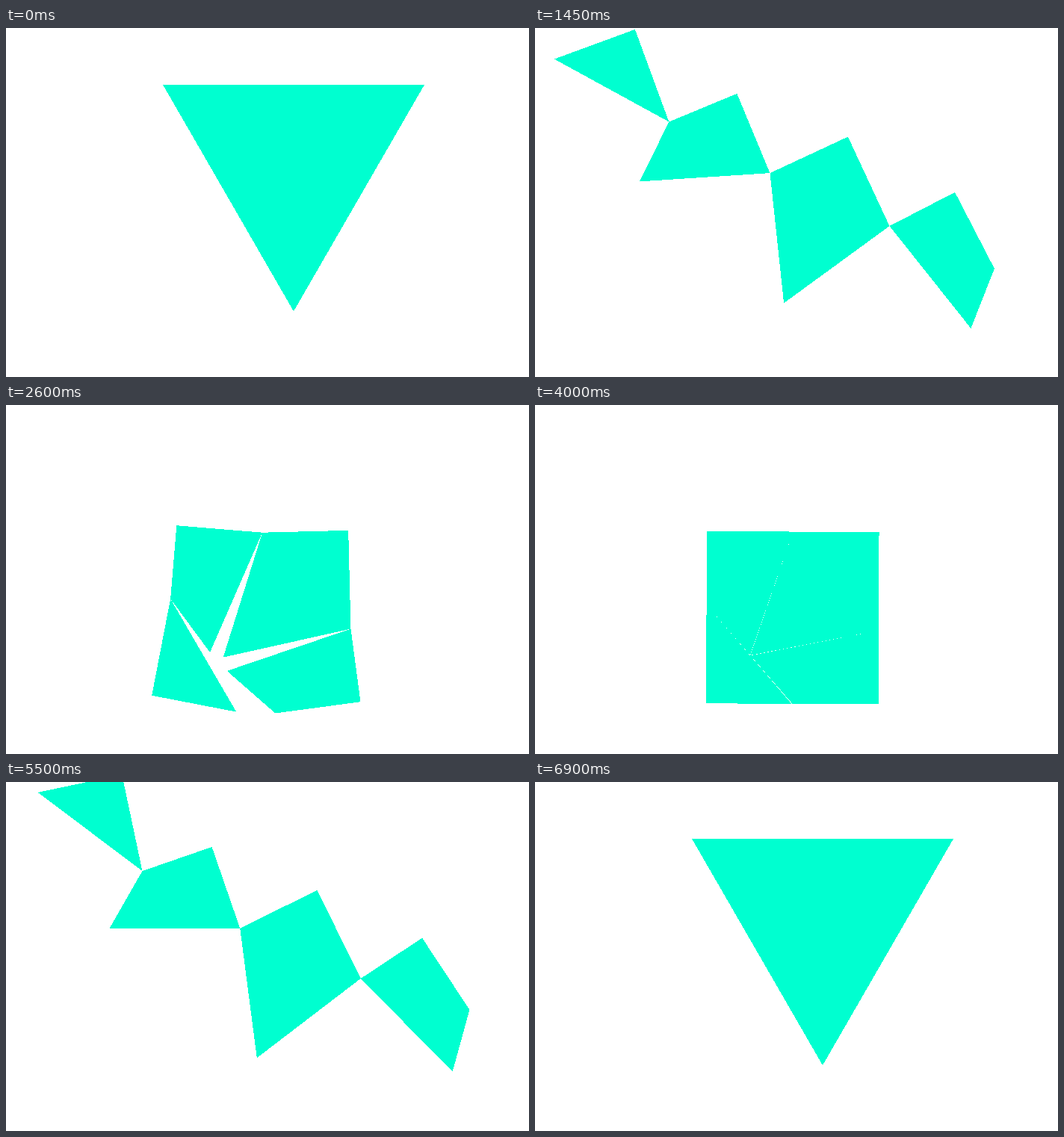
An HTML page that plays this animation: 700x467 px, repeating every 7.95 s.

```html
<!DOCTYPE html>
<html lang="en">
<head>
<meta charset="utf-8">
<title>Hinged triangle to square</title>
<style>
  html, body { margin: 0; height: 100%; overflow: hidden; background: #fff; }
  svg { display: block; width: 100%; height: 100%; }
</style>
</head>
<body>
<svg viewBox="0 0 700 467" fill="#00ffd0" shape-rendering="crispEdges">
  <g id="core">
    <g id="left"><g id="tip"></g></g>
    <g id="right"></g>
  </g>
</svg>
<script>
const STEP = 50, STEPS = 59, LOOP = 7950, REVERSE_FROM = 3950;
const TURN = 49.1;          // total rotation of the core piece, degrees
const PIVOT = [385, 251];

// Equilateral triangle, point down, cut into four hinged pieces
const side = 350, half = side / 2, height = side * Math.sqrt(3) / 2;
const A = [210, 76], C = [A[0] + side, A[1]], B = [A[0] + half, A[1] + height];
const mix = (p, q, t) => [p[0] + (q[0] - p[0]) * t, p[1] + (q[1] - p[1]) * t];
const L = mix(A, B, 0.5), R = mix(C, B, 0.5);

// The long cut R-F is as long as the side of the square of equal area
const cut = Math.sqrt(side * height / 2);
const run = Math.sqrt(cut ** 2 - (height / 2) ** 2);
const F = [R[0] - run, A[1]], G = [F[0] + half, A[1]];
const foot = half * run / cut / cut;
const P = mix(R, F, foot), Q = mix(F, R, foot);

const byId = id => document.getElementById(id);

function addPiece(id, ...points) {
  const shape = document.createElementNS(byId(id).namespaceURI, 'polygon');
  shape.setAttribute('points', points.join(' '));
  byId(id).append(shape);
}

function rotate(id, angle, [x, y]) {
  byId(id).setAttribute('transform', `rotate(${angle} ${x} ${y})`);
}

addPiece('core', B, R, P, L);
addPiece('left', L, P, F, A);
addPiece('tip', F, Q, G);
addPiece('right', R, Q, G, C);

function draw() {
  const time = performance.now() % LOOP;
  const stepsFrom = start => Math.min(STEPS, Math.max(0, Math.floor((time - start) / STEP)));
  const progress = (stepsFrom(0) - stepsFrom(REVERSE_FROM)) / STEPS;
  const eased = (1 - Math.cos(Math.PI * progress)) / 2;
  const hinge = 180 * eased;

  rotate('core', TURN * eased, PIVOT);
  rotate('left', -hinge, L);
  rotate('tip', -hinge, F);
  rotate('right', hinge, R);
  requestAnimationFrame(draw);
}
draw();
</script>
</body>
</html>
```
